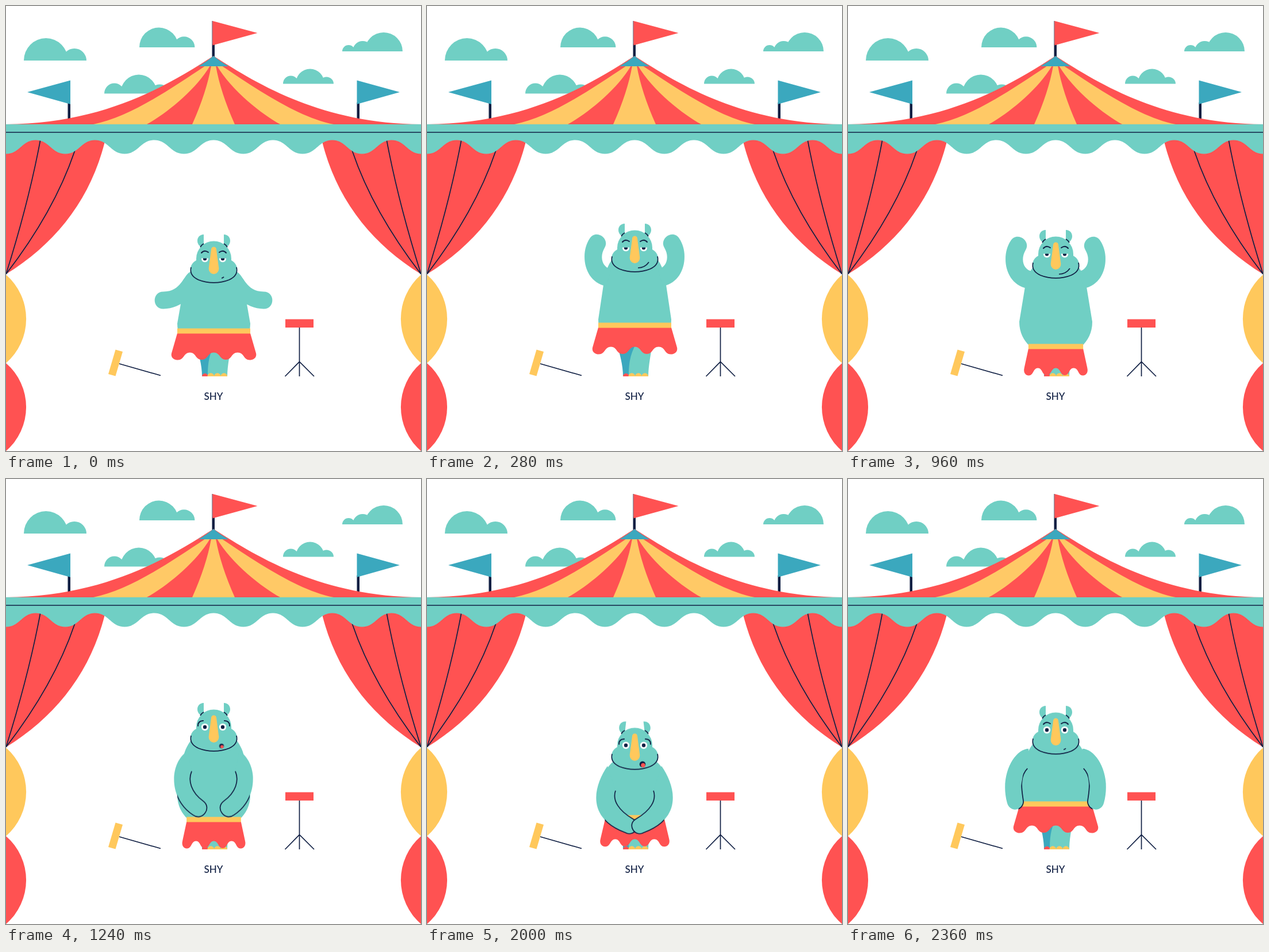
Recreate the animation shown at these times as an HTML page without scripts. Size 722 by 775 pixels, loop 2.4 s.

```html
<!DOCTYPE html>
<html lang="en">
<head>
<meta charset="utf-8">
<title>Shy</title>
<style>
@property --dy { syntax: "<number>"; inherits: true; initial-value: 0; }
@property --drop { syntax: "<number>"; inherits: true; initial-value: 0; }
@property --girth { syntax: "<number>"; inherits: true; initial-value: 1; }
:root {
  --teal: #70cfc4; --red: #ff5252; --yellow: #ffc85c; --navy: #101f43; --blue: #3ba8be;
  --out: path("M322 462C308 468 306 498 274 498C254 498 254 528 274 528C290 528 302 522 322 508");
  --wide: path("M320 462C308 470 290 470 257 463C237 459 231 489 251 493C275 498 296 500 314 494");
  --up: path("M320 462C306 460 299 442 309 425C319 408 293 392 283 409C266 434 272 484 312 492");
  --down: path("M314 470C290 470 262 515 277 566C282 583 305 580 306 563C304 548 296 520 312 504");
  --fold: path("M316 474C284 494 282 556 325 585C341 597 359 573 343 561C322 546 316 525 323 509");
  --clasp: path("M314 500C290 535 276 590 345 616C361 625 375 601 358 592C334 578 322 560 328 543");
  --calm: path("M340 422Q345 416 352 421");
  --worried: path("M334 430Q334 421 343 421");
  --pout: path("M375 466Q377 466 379 464");
  --smile: path("M367 467Q379 467 386 457");
}
html, body { margin: 0; width: 100%; height: 100%; overflow: hidden; background: #fff; }
svg { display: block; animation: bounce 2.4s linear infinite, slip 2.4s linear infinite; }
.teal { fill: var(--teal); } .red { fill: var(--red); } .yellow { fill: var(--yellow); }
.navy { fill: var(--navy); } .blue { fill: var(--blue); } .canvas { fill: #ffc966; }
.ink { fill: none; stroke: var(--navy); stroke-width: 1.7; }
.mirror { transform: matrix(-1, 0, 0, 1, 723, 0); }
.mirror.limb { transform: matrix(-1, 0, 0, 1, 722, 0); }
text { font: 500 17px Lato, sans-serif; text-anchor: middle; }

.head { transform: translateY(calc(var(--dy) * 1px)); }
.body { transform-origin: 361.5px 590px; transform: scaleY(calc(1 - var(--dy) / 110)); }
.skirt { transform-origin: 361.5px 570px; transform: translateY(calc(var(--drop) * 1px)) scaleX(var(--girth)); }
.ear { transform-origin: 341px 412px; transform: rotate(calc(max(0, var(--dy) - 8) * .27deg)); }
.arm { d: var(--out); animation: reach 2.4s linear infinite; }
.edge { animation: reach 2.4s linear infinite, outline 2.4s linear infinite; }
.lid { transform-origin: 346px 424px; animation: blink 2.4s linear infinite; }
.brow { stroke-width: 2; stroke-linecap: round; animation: brow 2.4s linear infinite; }
.lips { animation: lips 2.4s linear infinite; }
.gasp { transform-origin: 375px 465px; animation: gasp 2.4s linear infinite; }

@keyframes bounce {
  0%, 100% { --dy: 8; }
  3.33% { --dy: 1; }
  6.67% { --dy: -12; }
  9.17% { --dy: -14; }
  11.667% { --dy: -11; }
  16.67% { --dy: -4; }
  21.67%, 71.67% { --dy: 0; }
  73.33% { --dy: -2; }
  76.67% { --dy: 16; }
  80% { --dy: 35; }
  83.333% { --dy: 32; }
  86.67% { --dy: 14; }
  90% { --dy: -2; }
  93.33% { --dy: 0; }
  95% { --dy: 1; }
  98.333% { --dy: 5; }
}
@keyframes slip {
  0%, 3.33%, 93.33%, 100% { --drop: 0; --girth: 1; }
  6.67% { --drop: -8; }
  11.667% { --drop: -10; }
  16.67% { --drop: -7; }
  25% { --drop: -6; --girth: 1; }
  29.17% { --drop: 0; --girth: .97; }
  33.33% { --drop: 14; --girth: .86; }
  36.67% { --drop: 29; --girth: .74; }
  38.33% { --drop: 26; }
  40% { --drop: 27; --girth: .75; }
  51.667%, 73.33% { --drop: 27; --girth: .745; }
  80% { --drop: 32; --girth: .76; }
  83.333% { --drop: 24; --girth: .816; }
  86.67% { --drop: 8; --girth: .93; }
  90% { --drop: -4; --girth: 1; }
}
@keyframes reach {
  0%, 100% { d: var(--out); transform: none; }
  2.5% { d: var(--wide); transform: none; }
  7.5% { d: var(--up); transform: translateY(-6px); }
  11.667% { d: var(--up); transform: translateY(-4px); }
  20%, 46.67% { d: var(--up); transform: translateY(0); }
  48.33% { d: var(--wide); transform: translateY(0); }
  50% { d: var(--down); transform: translateY(-5px); }
  51.667% { d: var(--fold); transform: translateY(0); }
  55%, 71.67% { d: var(--clasp); transform: translateY(-32px); }
  73.33% { d: var(--clasp); transform: translateY(-34px); }
  76.67% { d: var(--clasp); transform: translateY(-16px); }
  80% { d: var(--clasp); transform: translateY(3px); }
  83.333% { d: var(--clasp); transform: translateY(0); }
  86.67% { d: var(--clasp); transform: translateY(-16px); }
  89.17% { d: var(--clasp); transform: translateY(-30px); }
  91.67%, 93.33% { d: var(--fold); transform: translateY(0); }
  98.333% { d: var(--down); transform: translateY(0); }
}
@keyframes outline {
  0%, 50% { opacity: 0; }
  50.01%, 99% { opacity: 1; }
  99.01%, 100% { opacity: 0; }
}
@keyframes blink {
  0%, 46.67%, 100% { transform: scaleY(1); }
  50%, 98.333% { transform: scaleY(0); }
}
@keyframes brow {
  0%, 46.67%, 97%, 100% { d: var(--calm); }
  50%, 91.67% { d: var(--worried); }
}
@keyframes lips {
  0%, 100% { d: var(--pout); opacity: 1; }
  6.67%, 46.67% { d: var(--smile); opacity: 1; }
  49.9% { d: var(--pout); opacity: 1; }
  50%, 94% { d: var(--pout); opacity: 0; }
  94.01% { d: var(--pout); opacity: 1; }
}
@keyframes gasp {
  0%, 49%, 94%, 100% { transform: scale(0); }
  51.667% { transform: scale(.75); }
  57%, 88% { transform: scale(1); }
}
</style>
</head>
<body>
<svg width="722" height="775" viewBox="0 0 722 775">
  <defs>
    <path id="torso" d="M326 450C317 460 311 472 309 483L298 550C298 569 306 583 316 592H407C417 583 425 569 425 550L414 483C412 472 406 460 397 450z"/>
    <path id="frill" d="M298 570L288.5 603C285 613 294 617 299 616.5c11 0 10-13 21-13s9 12.5 20.5 12.5s10-12.5 21-12.5s10 12.5 21 12.5s9-12.5 20.5-12.5s10 13 21 13C429 617 438 613 434.5 603L425 570z"/>
    <clipPath id="inside">
      <use class="body" href="#torso"/>
      <use class="skirt" href="#frill"/>
      <rect class="skirt" x="298" y="561" width="127" height="10"/>
    </clipPath>
    <g id="drape">
      <path class="red" d="M0 210H176L172 236C147 337 86 414 0 467z"/>
      <path class="ink" d="M60 232Q40 340 0 467M121 248Q86 355 0 467"/>
      <path class="yellow" d="M0 468A102 102 0 0 1 0 622z"/>
      <path class="red" d="M0 622A101 101 0 0 1 0 775z"/>
    </g>
    <path id="stripe" class="canvas" d="M347 104C283 147 213 194 152 206H245C275 190 330 147 355 104z"/>
  </defs>

  <!-- sky -->
  <path class="teal" d="M31 95a38.5 39 0 0 1 77 0zM98 95a21 21 0 0 1 42 0z
    M232 72a34 34.5 0 0 1 68 0zM291 72a18.7 18.7 0 0 1 37.4 0z
    M585 79a11 11 0 0 1 22 0zM603 79a17.5 18 0 0 1 35 0zM624 79a33 33 0 0 1 66 0z
    M171 152.5a17.5 18 0 0 1 35 0zM199 152.5a32 33 0 0 1 64 0zM250 152.5a17.5 16 0 0 1 35 0z
    M482 135.5a13.5 14 0 0 1 27 0zM504 135.5a25 26 0 0 1 50 0zM545 135.5a12.5 12 0 0 1 25 0z"/>

  <!-- tent -->
  <path class="navy" d="M358.5 26h1V66h3.5V92h-4.5zM107.5 168h4.5v34h-4.5zM610.5 168h4.5v34h-4.5z"/>
  <path class="red" d="M359.3 26L437.5 47L359.3 68.5z"/>
  <path class="blue" d="M112 129.5L37 150L112 171zM610.5 129.5L685 150L610.5 171z"/>
  <path class="red" d="M361 87C283 137 172 205 0 206H722C550 205 439 137 361 87z"/>
  <use href="#stripe"/>
  <use href="#stripe" transform="matrix(-1 0 0 1 722 0)"/>
  <path class="canvas" d="M357 104Q349 150 324 206H398Q373 150 365 104z"/>
  <path class="blue" d="M361 87Q373 97 387 105H335Q349 97 361 87z"/>
  <use href="#drape"/>
  <use href="#drape" transform="matrix(-1 0 0 1 722 0)"/>
  <path class="teal" d="M0 206V257.5c24 0 27.6-24 51.6-24s27.6 24 51.6 24 27.6-24 51.6-24 27.6 24 51.6 24 27.6-24 51.6-24 27.6 24 51.6 24 27.6-24 51.6-24 27.6 24 51.6 24 27.6-24 51.6-24 27.6 24 51.6 24 27.6-24 51.6-24 27.6 24 51.6 24 27.6-24 51.6-24 27.6 24 51.6 24V206z"/>
  <path class="ink" d="M0 220H722"/>

  <!-- stools -->
  <path class="yellow" d="M190.5 598.5L203 602L190.5 644.5L178 641z"/>
  <path class="red" d="M486 545.5h49v14.5h-49z"/>
  <path class="ink" d="M197 623L269 643.5M510.5 560V645M485.5 645L510.5 619.5L536 645"/>
  <text class="navy" x="361" y="685.5">SHY</text>

  <!-- legs -->
  <path class="blue" d="M331 590C335 605 341 625 341 645H353L366 588z"/>
  <path class="red" d="M341 645a5.2 5.2 0 0 1 10.4 0z"/>
  <path class="teal" d="M364 588C354 605 351 620 351 645H385C385 625 390 605 392 588z"/>
  <path class="yellow" d="M350.5 645a5.8 5.8 0 0 1 11.6 0a5.7 5.7 0 0 1 11.4 0a5.7 5.7 0 0 1 11.4 0z"/>

  <!-- body -->
  <use class="body teal" href="#torso"/>
  <g class="skirt">
    <use class="red" href="#frill"/>
    <rect class="yellow" x="298" y="561.5" width="127" height="9"/>
  </g>
  <g>
    <path class="arm teal"/>
    <g clip-path="url(#inside)"><path class="edge ink" pathLength="100" stroke-dasharray="0 10 90 0"/></g>
  </g>
  <g class="mirror limb">
    <path class="arm teal"/>
    <g clip-path="url(#inside)"><path class="edge ink" pathLength="100" stroke-dasharray="0 10 90 0"/></g>
  </g>

  <!-- head -->
  <g class="head">
    <path class="ear teal" d="M344 390C337 390 333 395 333 401C333 407 337 411 341 412L344 416z"/>
    <g class="mirror"><path class="ear teal" d="M344 390C337 390 333 395 333 401C333 407 337 411 341 412L344 416z"/></g>
    <path class="teal" d="M331 435V432A30.5 30.5 0 0 1 392 432V435C400 439 403 447 402 455C401 467 381 474 361.5 474S322 467 321 455C320 447 323 439 331 435z"/>
    <path class="ink" d="M322 447C319 459 326 465 335 469C351 475.5 372 475.5 388 469C397 465 404 459 401 447"/>
    <g>
      <path class="ink" d="M338 412Q340 408 344 406"/>
      <circle cx="346" cy="432" r="6.2" fill="#fff"/><circle class="navy" cx="346" cy="432" r="3.2"/>
      <rect class="lid teal" x="338" y="424" width="16" height="7.5"/>
      <path class="brow ink"/>
    </g>
    <g class="mirror">
      <path class="ink" d="M338 412Q340 408 344 406"/>
      <circle cx="346" cy="432" r="6.2" fill="#fff"/><circle class="navy" cx="346" cy="432" r="3.2"/>
      <rect class="lid teal" x="338" y="424" width="16" height="7.5"/>
      <path class="brow ink"/>
    </g>
    <path class="yellow" d="M357 416a4.5 4.5 0 0 1 9 0L370.2 448a8.8 9.5 0 1 1-17.4 0z"/>
    <path class="lips ink"/>
    <g class="gasp">
      <circle class="navy" cx="375" cy="465" r="5.3"/>
      <circle class="red" cx="376" cy="466.8" r="3.7"/>
    </g>
  </g>
</svg>
</body>
</html>
```
